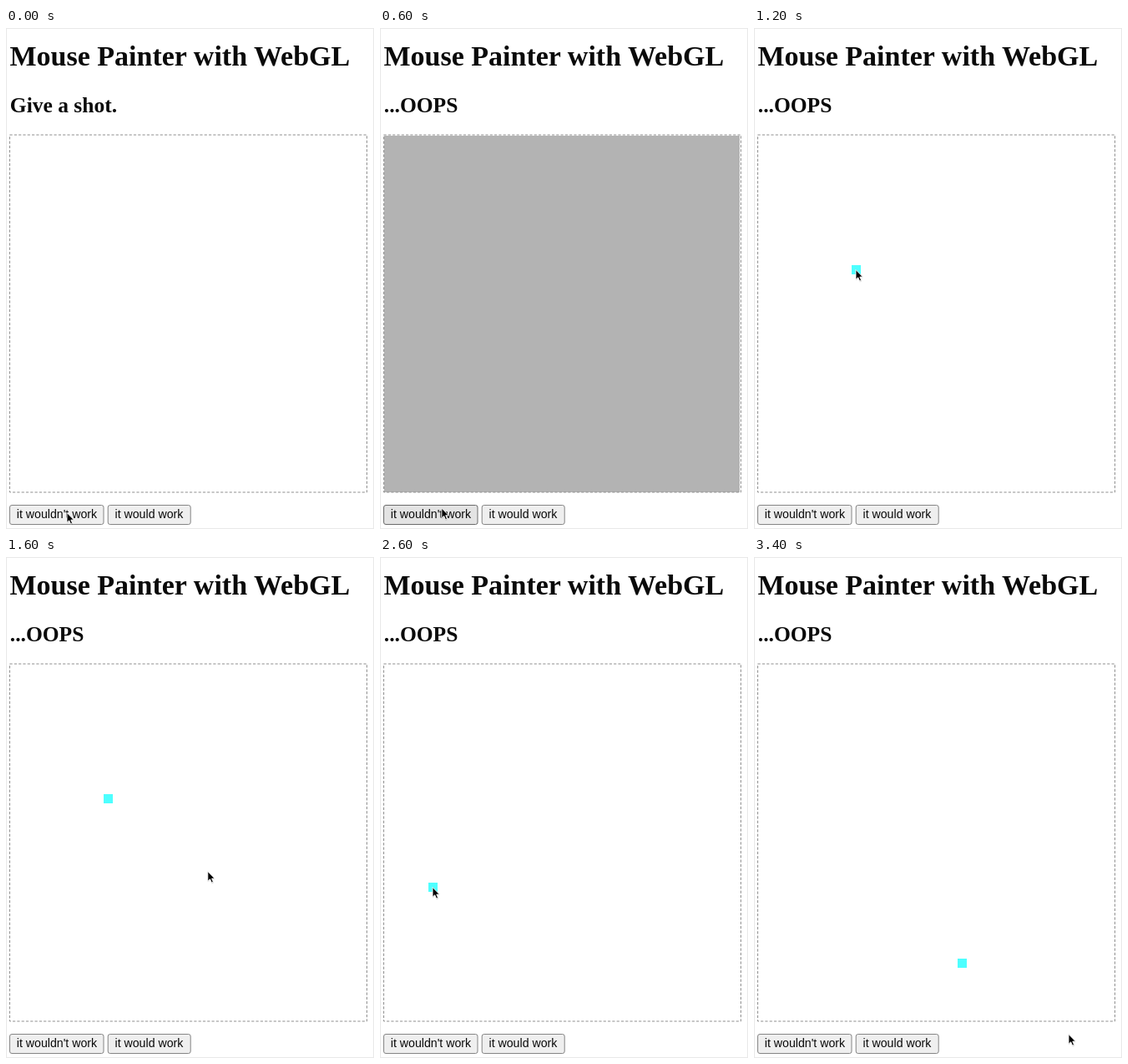
Recreate the animation shown at these times as an HTML page. Size 441x600 px, loop 3500 ms.

```html
<!DOCTYPE html>
<html lang="en">
<head>
<meta charset="utf-8">
<title>Mouse Painter with WebGL</title>
<style>
  html, body { margin: 0; width: 100%; height: 100%; overflow: hidden; background: #fff; }
  svg { display: block; width: 441px; height: 600px; }
  .serif { font-family: "Liberation Serif", Times, serif; font-weight: bold; fill: #0a0a0a; }
  .sans { font-family: "Liberation Sans", Arial, sans-serif; font-size: 14.17px; fill: #0a0a0a; }
  .button { fill: #efefef; stroke: #858585; }
  .button.hover { fill: #e3e3e3; stroke: #6a6a6a; }
</style>
</head>
<body>
<svg viewBox="0 0 441 600">
  <rect x=".5" y=".5" width="440" height="599" fill="#fff" stroke="#e8e8e8"/>
  <text class="serif" x="4.5" y="45" font-size="34">Mouse Painter with WebGL</text>
  <text class="serif" id="status" x="4.8" y="101" font-size="25.5"></text>

  <rect id="fill" x="5" y="129" width="426" height="427" fill="#b3b3b3"/>
  <rect x="4.5" y="128" width="428" height="428" fill="none" stroke="#8f8f8f" stroke-dasharray="3.2 2.1"/>
  <rect id="dot" width="11" height="11" fill="#4dffff"/>

  <rect id="first" class="button" x="4.5" y="571.5" width="112.5" height="23" rx="2.5"/>
  <text class="sans" x="12.8" y="587.3">it wouldn't work</text>
  <rect class="button" x="122.2" y="571.5" width="99" height="23" rx="2.5"/>
  <text class="sans" x="130.5" y="587.3">it would work</text>

  <g id="cursor">
    <path d="M0 1.2V13L2.8 10.5L4.8 15L7 14L5.2 9.8H9Z" fill="#000" opacity=".14"/>
    <path d="M0 0V11.8L2.7 9.3L4.6 13.6L6.6 12.7L4.8 8.6H8.4Z" fill="#000" stroke="#fff" stroke-width=".9" stroke-linejoin="round"/>
  </g>
</svg>
<script>
const LOOP = 3500, TICK = 100, OOPS = 100;
const $ = id => document.getElementById(id);
const status = $("status"), fill = $("fill"), dot = $("dot"), first = $("first"), cursor = $("cursor");

// Pointer moves; a move with a click paints a square where it ends
const home = { x: 73, y: 580 };
const moves = [
  { from: 500, to: 1100, x: 122, y: 289, click: 1200 },
  { from: 1300, to: 1800, x: 283, y: 406, click: 1800 },
  { from: 1900, to: 2100, x: 92, y: 393 },
  { from: 2100, to: 2500, x: 63, y: 395, click: 2600 },
  { from: 2600, to: 2900, x: 249, y: 486, click: 3000 },
  { from: 3200, to: 3400, x: 377, y: 571 }
];

const clamp = p => Math.min(1, Math.max(0, p));
const smooth = p => p < .5 ? 4 * p ** 3 : 1 - (2 - 2 * p) ** 3 / 2;

function pointer(t) {
  let { x, y } = home;
  for (const m of moves) {
    const p = smooth(clamp((t - m.from) / (m.to - m.from)));
    x += (m.x - x) * p;
    y += (m.y - y) * p;
  }
  return { x, y };
}

function show(el, on) {
  el.setAttribute("visibility", on ? "visible" : "hidden");
}

function render(ms) {
  const t = Math.floor((ms % LOOP) / TICK) * TICK;
  const { x, y } = pointer(t);
  const hit = moves.filter(m => m.click <= t).pop();

  status.textContent = t < OOPS ? "Give a shot." : "...OOPS";
  show(fill, t >= OOPS && !hit);
  show(dot, !!hit);
  if (hit) {
    dot.setAttribute("x", hit.x - 5);
    dot.setAttribute("y", hit.y - 5);
  }
  first.classList.toggle("hover", t >= OOPS && x < 117 && y > 571);
  cursor.setAttribute("transform", `translate(${x.toFixed(1)} ${(y + .5).toFixed(1)})`);
}

const start = performance.now();
function loop() {
  render(performance.now() - start);
  requestAnimationFrame(loop);
}
loop();
</script>
</body>
</html>
```
